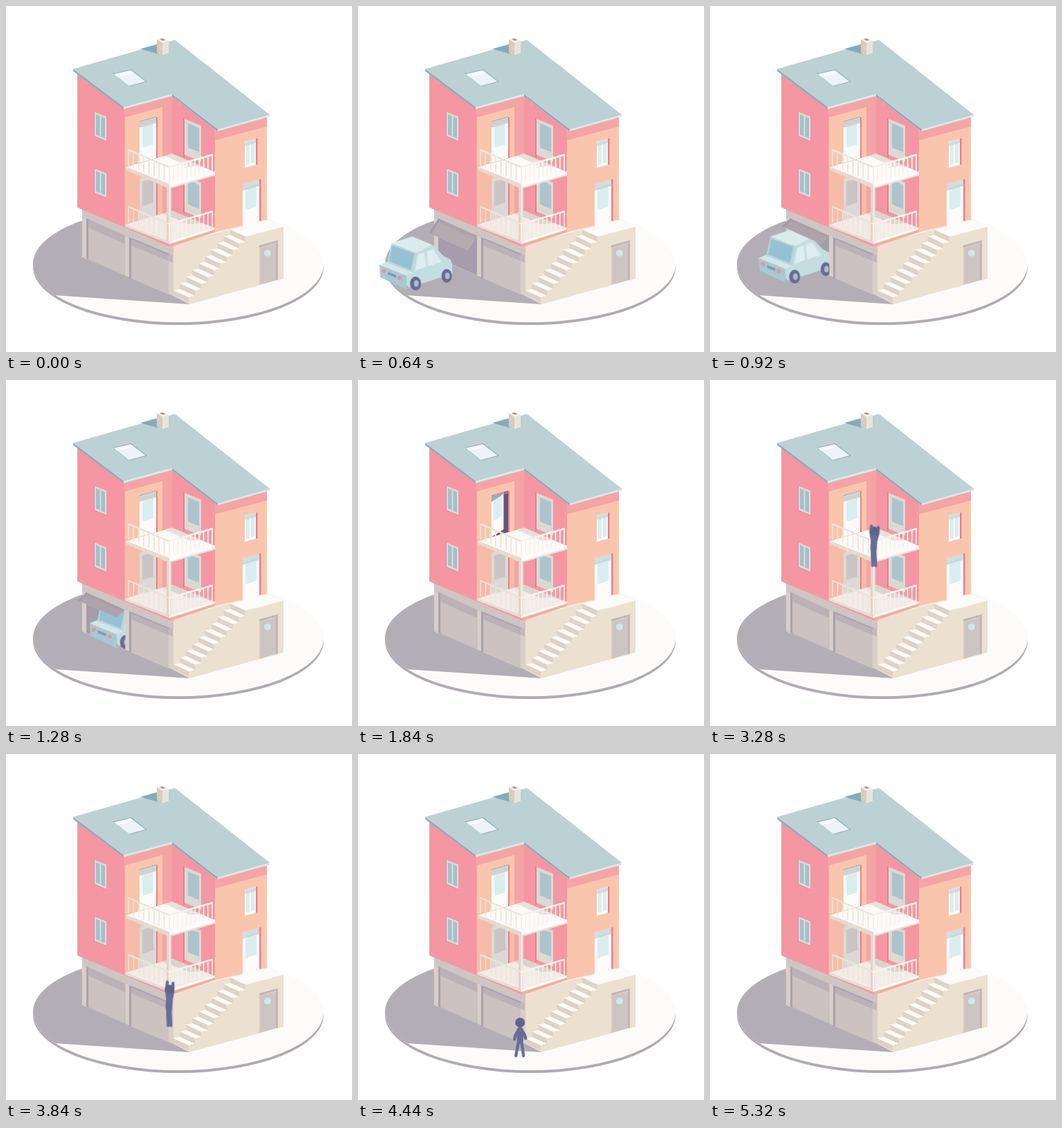
These frames come from a looping animation (500 by 500 pixels, 6.32 s). An HTML page:

```html
<!DOCTYPE html>
<html lang="en">
<head>
<meta charset="utf-8">
<title>House</title>
<style>
  html, body { margin: 0; width: 100%; height: 100%; overflow: hidden; background: #fff; }
  svg { display: block; width: 100vw; height: 100vh; }
  .pink { fill: #f497a3; }
  .peach { fill: #fac5ad; }
  .deep { fill: #e77f92; }
  .shade { fill: #f5a4a6; }
  .white { fill: #fdfbf9; }
  .beige { fill: #ece0d1; }
  .dim { fill: #d9cfc8; }
  .panel { fill: #cbc2c1; }
  .frame { fill: #dcd9d4; }
  .glass { fill: #adc4cc; }
  .pale { fill: #daeef1; }
  .veil { fill: #a79eae; opacity: .45; }
  .rail { fill: none; stroke-linecap: round; stroke-linejoin: round; }
  .body { fill: none; stroke: #686c97; stroke-linecap: round; stroke-linejoin: round; }
</style>
</head>
<body>
<svg viewBox="0 0 500 500">
  <defs>
    <clipPath id="disc"><ellipse cx="249" cy="373" rx="210" ry="84"/></clipPath>
    <clipPath id="drive"><path d="M0 280H116V307L172.500 332V450H0Z"/></clipPath>
    <clipPath id="doorway"><path d="M193 167L217 160V220L193 227Z"/></clipPath>
    <g id="sash">
      <path class="deep" d="M-1 -.5L0 0V35L17 42V43L-1 35.500Z"/>
      <path fill="#d9dcd9" d="M0 0L17 7V42L0 35Z"/>
      <path fill="#a5c0c9" d="M2 3.500L7.500 5.800V35L2 32.700ZM9.500 6.600L15 9V38.200L9.500 36Z"/>
    </g>
    <g id="sidedoor">
      <path class="deep" d="M-2 -1L0 0V56L-2 55Z"/>
      <path class="frame" d="M0 0L24 10V62L0 52Z"/>
      <path class="glass" d="M5 6.500L21 13.500V48L5 41.500Z"/>
    </g>
  </defs>

  <!-- ground -->
  <ellipse cx="249" cy="377" rx="210" ry="84" fill="#b0aab4"/>
  <ellipse cx="249" cy="373" rx="210" ry="84" class="white"/>
  <path clip-path="url(#disc)" fill="#b3aeb6" d="M0 250L130 280L242 400L265 431L70 418L0 413Z"/>

  <!-- basement, left side -->
  <path class="dim" d="M110 290L242 345V419L110 363Z"/>
  <path fill="#a59dac" d="M116 307L172 332V389L116 365Z"/>
  <path fill="#a9a1b0" d="M178 334L235 358V417L178 393Z"/>
  <path class="panel" d="M181 337L235 360V417L181 394Z"/>
  <path class="veil" d="M181 335L241 360V371L181 346Z"/>
  <path class="veil" d="M110 293L242 347V361L110 306Z" style="opacity:.2"/>

  <g clip-path="url(#drive)">
    <g id="car">
      <path fill="#c3dde0" d="M123 346L146 335L151 339L162 351L172 356L175 362V377L112 397L108 391V380L118 374Z"/>
      <path fill="#a7c9d1" d="M70 364L109 380V400L71 382Z"/>
      <path fill="#d3e7e8" d="M70 364L82 359L120 374L109 380Z"/>
      <path fill="#b9d6db" d="M87 333L123 347L118 375L81 361Z"/>
      <path fill="#96c0d4" d="M88 336L120 348L115 371L84 359Z"/>
      <path fill="#dcebeb" d="M87 333L117 323L146 335L123 347Z"/>
      <path fill="#deedef" d="M126 349L135 346L137 367L121 373ZM138 345L147 341L160 360L140 366Z"/>
      <path fill="#7c9db2" d="M82 374L94 379V383L82 378Z"/>
      <circle cx="76" cy="373" r="3" fill="#f28f9c"/>
      <circle cx="99" cy="383" r="3" fill="#f28f9c"/>
      <g fill="#666c92"><ellipse cx="122" cy="391" rx="8" ry="10"/><ellipse cx="167" cy="380" rx="7.500" ry="10"/></g>
      <g fill="#b3bccb"><ellipse cx="123" cy="391" rx="3.500" ry="4.800"/><ellipse cx="168" cy="380" rx="3.300" ry="4.800"/></g>
    </g>
  </g>
  <g transform="matrix(1 .446 0 1 116 307)">
    <g id="gate">
      <rect width="56" height="57.500" fill="#a9a1b0"/>
      <rect x="3" width="53" height="57.500" class="panel"/>
      <rect x="3" width="53" height="12" class="veil"/>
      <rect id="gloom" width="56" height="57.500" fill="#a0959f"/>
    </g>
  </g>

  <!-- basement, right side -->
  <path class="beige" d="M242 345L377 308L401 319V394L265 431L242 419Z"/>
  <path class="white" d="M333 321L377 308L401 319L355 331Z"/>
  <g id="stairs"></g>
  <path fill="#d8ccc2" d="M366 347L393 339.500V395.500L366 403Z"/>
  <path fill="#cdc5c1" d="M368 350L390 344V396L368 402Z"/>
  <path fill="#bfb5b4" d="M366 346L393 338.500V341L366 349ZM390 342H393V395.500L390 396Z"/>
  <circle cx="378" cy="357" r="5" fill="#cfe7e7"/>

  <!-- walls -->
  <path class="pink" d="M103 94L171 145V317L238 343V348L103 291Z"/>
  <path class="shade" d="M171 147L240 128V300L171 320Z"/>
  <path class="peach" d="M172 161L226 146V240H172Z"/>
  <path fill="#f6bba9" d="M172 230H226V302L172 318Z"/>
  <path class="pink" d="M240 128L303 177V326L240 300Z"/>
  <path class="peach" d="M302 178L377 158V309L302 327Z"/>
  <path class="shade" d="M302 178L377 158V174L302 194Z"/>
  <use href="#sash" x="128" y="153"/>
  <use href="#sash" x="128" y="235"/>

  <path class="deep" d="M361 192L363.500 191V228.500L361 229.500Z"/>
  <path class="white" d="M345 196L361 191.500V229.500L345 234Z"/>
  <path class="pale" d="M347 198L352 196.500V228L347 229.500ZM354 196L359.500 194.500V226L354 227.500Z"/>
  <path fill="#c0cfd1" opacity=".6" d="M345 196L361 191.500V198L345 202.500Z"/>
  <path class="deep" d="M366 251L368.500 250V310H366Z"/>
  <path class="white" d="M342 258L366 251V311L342 321Z"/>
  <path class="pale" d="M346 263L362 258V290L346 295Z"/>
  <path fill="#b9cccd" opacity=".65" d="M342 258L366 251V260L342 267Z"/>

  <!-- recess, lower floor -->
  <path class="frame" d="M193 249L217 242V304L193 311Z"/>
  <path fill="#c9c6c2" d="M197 254L213 249V284L197 289Z"/>
  <path class="deep" d="M217 242L219 241.500V302L217 302.500Z"/>
  <use href="#sidedoor" x="258" y="245"/>
  <path fill="#f2ebe6" d="M172 316L240 296L302 321L236 342Z"/>
  <path fill="#ddd4cf" d="M226 300L240 296L284 314L264 315Z"/>
  <path fill="#e6dbd0" d="M172 316L236 340V344L172 319Z"/>
  <path class="white" d="M236 340L302 320V323L236 344Z"/>
  <path fill="#f6ab9f" d="M236 344L302 323V327L238 348Z"/>
  <path fill="#e0d4c9" d="M232 258H236V341L232 339Z"/>
  <path fill="#f0e7dd" d="M235 258H238.500V341H235Z"/>
  <g id="low"></g>

  <!-- recess, upper floor -->
  <path fill="#66547f" d="M193 167L217 160V220L193 227Z"/>
  <path fill="#b76585" d="M193 167L217 160V164L193 171Z"/>
  <g clip-path="url(#doorway)">
    <g transform="translate(193 167)">
      <g id="door">
        <rect width="24" height="60" class="white"/>
        <rect x="4" y="9" width="16" height="30" class="pale"/>
        <rect id="lintel" width="24" height="9"/>
      </g>
    </g>
  </g>
  <path class="deep" d="M217 160L219 161V220L217 220.500Z"/>
  <use href="#sidedoor" x="258" y="163"/>
  <path class="white" d="M173 233L240 213.500L302 240L236 258Z"/>
  <path fill="#e6dfda" d="M230 216.500L240 213.500L284 232L264 232Z"/>
  <path fill="#e6dbd0" d="M173 232L236 257V264L173 237Z"/>
  <path class="white" d="M236 257L302 239V245L236 264Z"/>
  <path fill="#e9dfd6" d="M236 262L302 243V245L236 264Z"/>
  <g id="high"></g>

  <!-- roof -->
  <path fill="#86aebc" d="M97 91L170 146V149L97 94ZM240 127L306 178V181L240 130Z"/>
  <path fill="#d9e8ea" d="M170 146L240 126V130L170 149ZM306 178L381 156V160L306 181Z"/>
  <path fill="#bcd1d4" d="M97 91L244 49L381 157L306 178L240 127L170 146Z"/>
  <path fill="#84abba" d="M194 62L219 55V69Z"/>
  <path fill="#93b5c0" d="M154 97.500L181 91.500L204 109.500L178 116.500Z"/>
  <path fill="#ecf4f9" d="M156 98.500L180.500 93L201.500 109L177.500 115.500Z"/>
  <path fill="#fbfdfe" d="M156 98.500L180.500 93L185 96.500L161 102.500Z"/>
  <path fill="#d8cbc0" d="M218 48L226 52V71L218 67Z"/>
  <path fill="#ece3d8" d="M226 52L235 50V68L226 71Z"/>
  <path fill="#f8f3ee" d="M218 48L226 45.500L235 49.500L226 53Z"/>
  <path fill="#a99d9b" d="M222 48L226 46.800L231 49.200L226.500 50.600Z"/>

  <g id="man">
    <path id="limbs" class="body" stroke-width="4.300"/>
    <path id="torso" class="body" stroke-width="9.500"/>
    <circle id="head" r="7" fill="#5f648f"/>
  </g>
  <g id="cover"></g>
</svg>

<script>
const LOOP = 6320;
const $ = id => document.getElementById(id);

function add(parent, d, attrs) {
  const el = document.createElementNS("http://www.w3.org/2000/svg", "path");
  el.setAttribute("d", d);
  for (const key in attrs) el.setAttribute(key, attrs[key]);
  parent.append(el);
}

// railing: posts along both sides of the corner, with a handrail
function railing(g, y) {
  const sides = [
    { x: 177, y: y, dx: 59, dy: 25, n: 8, color: "#efe3d8" },
    { x: 236, y: y + 25, dx: 62, dy: -18, n: 10, color: "#f8f1ea" }
  ];
  for (const s of sides) {
    let d = "";
    for (let i = 0; i <= s.n; i++) {
      const k = i / s.n;
      d += `M${s.x + s.dx * k} ${s.y + s.dy * k}v22`;
    }
    add(g, d, { class: "rail", stroke: s.color, "stroke-width": 1.6 });
    add(g, `M${s.x} ${s.y}l${s.dx} ${s.dy}`, { class: "rail", stroke: s.color, "stroke-width": 2.4 });
  }
}
railing($("low"), 290);
railing($("high"), 208);
$("cover").append($("high").cloneNode(true));

// stairs: each tread is followed by the riser below its front edge
for (let i = 0; i < 10; i++) {
  const x = 333 - 9.1 * i, y = 321 + 9.75 * i, g = $("stairs");
  add(g, `M${x} ${y}l22 10l-9.100 2.300l-22 -10Z`, { class: "white" });
  add(g, `M${x - 9.1} ${y + 2.3}l22 10v7.450l-22 -10Z`, { fill: "#dfd2c5" });
}

// keys: [time in ms, properties, easing]
function play(el, keys) {
  const all = [[0, keys[0][1]], ...keys, [LOOP, keys[keys.length - 1][1]]];
  el.animate(all.map(([t, props, easing = "linear"]) => ({ offset: t / LOOP, easing, ...props })),
    { duration: LOOP, iterations: Infinity });
}
const move = (x, y) => ({ transform: `translate(${x}px, ${y}px)` });
const fade = opacity => ({ opacity });

// there and back again: opens between a and b, closes between c and d
const swing = (el, [a, b, c, d], rest, open) =>
  play(el, [[a, rest, "ease-in-out"], [b, open], [c, open, "ease-in-out"], [d, rest]]);

play($("car"), [[440, move(-67, 17)], [1640, move(101, -25)]]);
play($("car"), [[400, fade(0)], [600, fade(1)], [1720, fade(1)], [1721, fade(0)]]);

const gateTimes = [420, 760, 1360, 1720];
swing($("gate"), gateTimes, { transform: "skewX(0deg) scaleY(1)" }, { transform: "skewX(-36deg) scaleY(.29)" });
swing($("gloom"), gateTimes, fade(0), fade(.7));

const doorTimes = [1740, 1980, 2320, 2580];
swing($("door"), doorTimes, { transform: "skewY(-16deg) scaleX(1)" }, { transform: "skewY(-62deg) scaleX(.25)" });
swing($("lintel"), doorTimes, { fill: "#cdd3d1" }, { fill: "#66547f" });

// pose: neck, hands and feet, measured from the hip
const pose = (neck, handL, handR, footL, footR) => ({ neck, handL, handR, footL, footR });
const stand = pose([0, -20], [-8, -4], [8, -5], [-6, 20], [5, 20]);
const strideA = pose([1, -20], [-7, -4], [9, -7], [-8, 18], [7, 20]);
const strideB = pose([1, -20], [-9, -7], [7, -4], [4, 20], [-3, 18]);
const climb = pose([2, -17], [-8, -3], [9, -6], [-4, 18], [7, 7]);
const sit = pose([-1, -13], [-17, -7], [4, -1], [-8, -3], [6, 10]);
const crouch = pose([0, -14], [-8, -12], [11, -10], [-3, 14], [4, 15]);
const hang = pose([1, -20], [-2, -39], [6, -37], [-1, 24], [3, 24]);
const squat = pose([1, -18], [-8, -11], [17, -12], [-6, 17], [6, 17]);

const path = [
  [1800, 209, 199, stand], [1940, 209, 199, stand],
  [2040, 214, 203, strideA], [2140, 221, 207, strideB], [2260, 228, 211, stand],
  [2380, 228, 211, stand], [2560, 230, 217, climb],
  [2700, 231, 228, sit], [2780, 231, 228, sit], [2960, 238, 237, crouch],
  [3080, 238, 239, crouch], [3320, 236, 247, hang], [4020, 235, 410, hang],
  [4110, 234, 422, squat], [4240, 234, 416, stand], [4440, 234, 416, stand]
];
const steps = 8;
for (let i = 1; i <= steps; i++) {
  const k = i / steps;
  path.push([4440 + 879 * k, 234 + 122 * k, 416 + 35 * k, i % 2 ? strideA : strideB]);
}

function limbs({ neck: [x, y], handL, handR, footL, footR }) {
  const limb = (sx, sy, [ex, ey], bend) =>
    `M${sx} ${sy}Q${(sx + ex) / 2 + bend} ${(sy + ey) / 2} ${ex} ${ey}`;
  return { d: `path("${limb(x - 3, y + 4, handL, -2)}${limb(x + 3, y + 4, handR, 2)}` +
    `${limb(-2, -1, footL, 0)}${limb(2, -1, footR, 0)}")` };
}
const trunk = ({ neck: [x, y] }) => ({ d: `path("M${x} ${y + 3}L0 -2")` });
const keys = fn => path.map(([t, x, y, p]) => [t, fn(p, x, y)]);

play($("man"), keys((p, x, y) => move(x, y)));
play($("limbs"), keys(limbs));
play($("torso"), keys(trunk));
play($("head"), keys(p => move(p.neck[0], p.neck[1] - 8)));
play($("man"), [[1860, fade(0)], [1960, fade(1)], [5120, fade(1)], [5319, fade(0)]]);
play($("cover"), [[2600, fade(1)], [2601, fade(0)], [5400, fade(0)], [5401, fade(1)]]);
</script>
</body>
</html>
```
